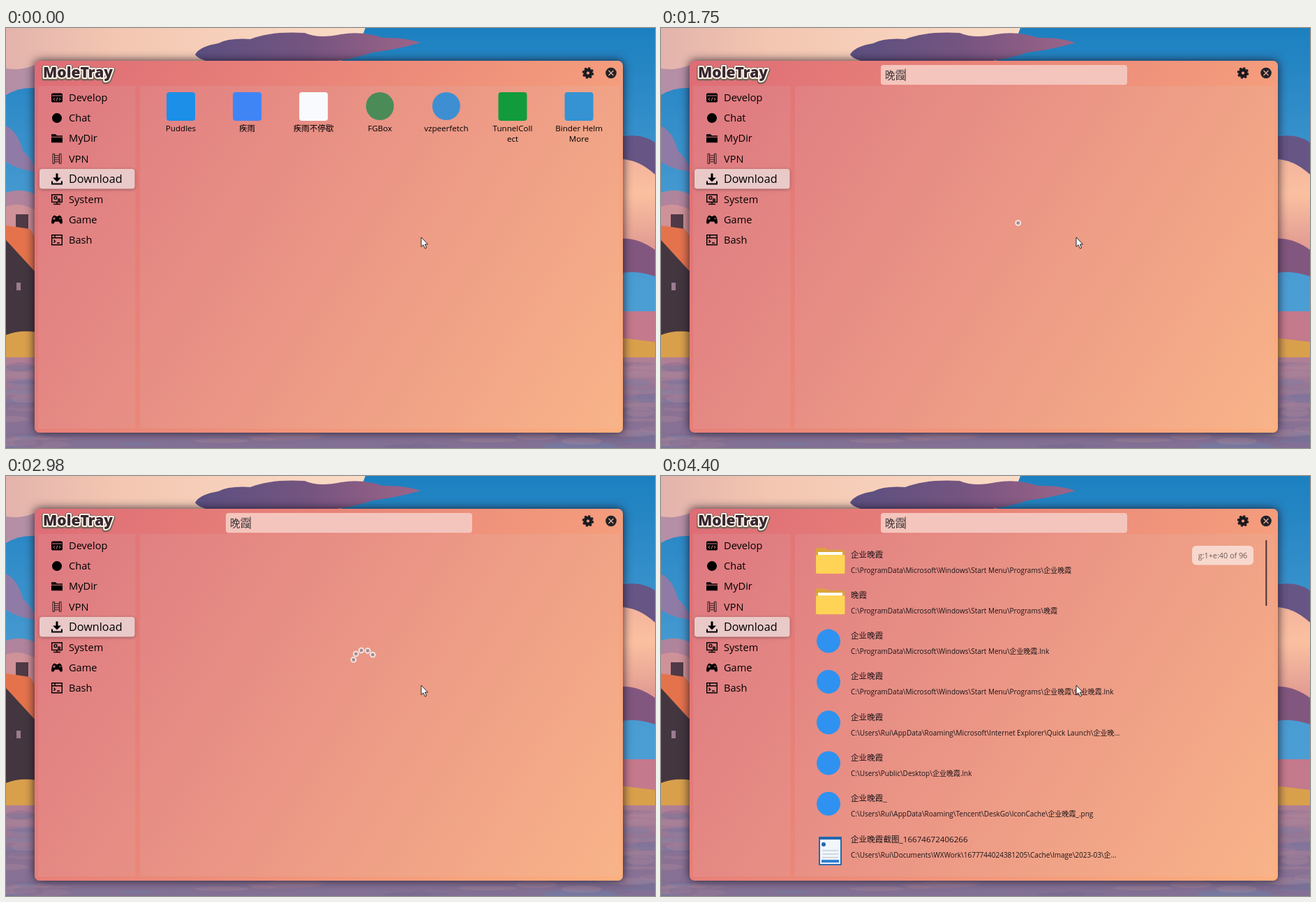
Animation of 930x602 px, one loop 4580 ms. Source, as an HTML page:

```html
<!DOCTYPE html>
<html lang="zh">
<head>
<meta charset="utf-8">
<style>
html, body { margin: 0; width: 100%; height: 100%; overflow: hidden; }
svg { display: block; width: 930px; height: 602px; font-family: "Open Sans", "Noto Sans CJK SC", "Noto Sans CJK", sans-serif; }
.mono { font-family: "Liberation Mono", monospace; }
.ime { font: bold 13px "Liberation Sans", sans-serif; }
.line { fill: none; stroke: #000; stroke-width: 1.4; }
</style>
</head>
<body>
<svg viewBox="0 0 930 602">
  <defs>
    <linearGradient id="sky" x2="0" y2="1">
      <stop offset="0" stop-color="#1c80c0"/><stop offset=".4" stop-color="#4599d0"/><stop offset=".7" stop-color="#4c9fd4"/>
    </linearGradient>
    <linearGradient id="peach">
      <stop offset="0" stop-color="#e3b3ac"/><stop offset=".3" stop-color="#f3c6b1"/><stop offset="1" stop-color="#fbdcc6"/>
    </linearGradient>
    <linearGradient id="glow" x2="0" y2="1">
      <stop offset="0" stop-color="#f3b49c"/><stop offset=".35" stop-color="#fbc0a0"/><stop offset="1" stop-color="#dc938f"/>
    </linearGradient>
    <linearGradient id="dusk">
      <stop offset="0" stop-color="#5b5080"/><stop offset=".5" stop-color="#755480"/><stop offset="1" stop-color="#9d6488"/>
    </linearGradient>
    <linearGradient id="water" x2="0" y2="1">
      <stop offset="0" stop-color="#b28095"/><stop offset=".5" stop-color="#8d7295"/><stop offset="1" stop-color="#827094"/>
    </linearGradient>
    <linearGradient id="pane" gradientUnits="userSpaceOnUse" x1="41" y1="47" x2="884" y2="580">
      <stop offset="0" stop-color="#de6c76"/><stop offset="1" stop-color="#fdb07f"/>
    </linearGradient>
  </defs>

  <g id="scene">
    <rect width="930" height="602" fill="url(#sky)"/>
    <path d="M0 0H515Q508 22 490 34L470 60H60Q30 80 0 76Z" fill="url(#peach)"/>
    <path d="M0 58Q22 62 44 52V86Q20 84 0 96Z" fill="#b48fa6"/>
    <path d="M0 140Q18 150 24 176Q36 186 44 206Q18 204 0 192Z" fill="#8f7ba6"/>
    <path d="M271 38Q278 26 304 22Q320 14 350 16Q380 4 428 7Q448 16 480 9Q510 4 540 14Q570 13 594 21Q560 31 525 35Q490 48 440 50H300Q276 46 271 38Z" fill="url(#dusk)"/>
    <path d="M0 236Q24 228 44 240V350H0Z" fill="#b0849c"/>
    <path d="M0 256Q20 248 44 262V300H0Z" fill="#cf9298"/>
    <path d="M880 156Q910 150 930 164V216H880Z" fill="#665585"/>
    <path d="M880 188Q906 188 930 210V330H880Z" fill="url(#glow)"/>
    <path d="M880 302Q905 300 930 318V356Q900 346 880 352Z" fill="#82577f"/>
    <path d="M880 406H930V450H880Z" fill="#c5798c"/>
    <path d="M0 410H44V470H0Z" fill="#a77a92"/>
    <path d="M14 267H32V292H14Z" fill="#503a47"/>
    <path d="M0 283L34 288L44 302V352L0 305Z" fill="#e4734c"/>
    <path d="M0 304L44 352V440H0Z" fill="#43363f"/>
    <path d="M15 365H21V376H15Z" fill="#9a7d92"/>
    <path d="M0 440Q20 432 44 436V473H0ZM880 444L930 450V473H880Z" fill="#d9a04c"/>
    <rect y="472" width="930" height="130" fill="url(#water)"/>
    <g id="ripples"></g>
  </g>

  <rect x="41" y="47" width="843" height="533" rx="7" fill="url(#pane)" style="filter:drop-shadow(0 0 7px #181020e0)"/>
  <g fill="#d0d0d8" fill-opacity=".11">
    <rect x="46" y="83" width="139.500" height="491"/><rect x="192" y="83" width="687" height="491"/>
  </g>
  <g font-size="21" font-weight="800" stroke-linejoin="round">
    <text x="53" y="72" fill="none" stroke="#7c6658" stroke-width="7">MoleTray</text>
    <text x="53" y="71" fill="#38262f" stroke="#fff5ea" stroke-width="4" paint-order="stroke">MoleTray</text>
  </g>
  <circle cx="834" cy="64.500" r="4.400" fill="none" stroke="#1c1b20" stroke-width="4.600"/>
  <circle cx="834" cy="64.500" r="7" fill="none" stroke="#1c1b20" stroke-width="2.600" stroke-dasharray="3.100 2.398"/>
  <circle cx="867" cy="64.500" r="7.800" fill="#222127"/>
  <path d="M863.500 61l7 7m0-7l-7 7" stroke="#e8b4a0" stroke-width="1.200"/>

  <rect x="48" y="202" width="136.500" height="28.500" rx="4" fill="#e9cac9" style="filter:drop-shadow(0 1px 2px #0005)"/>
  <g id="menu"></g>
  <g id="apps" font-size="11.600" text-anchor="middle"></g>
  <g id="search">
    <rect x="315" y="53" width="353" height="28.500" rx="4" fill="#f4c5bd"/>
    <text x="321" y="72.500" font-size="14.500" fill="#3a3033">晚霞</text>
    <path id="caret" d="M350 58.500V76" stroke="#222"/>
  </g>
  <g id="spinner" fill="#a08c94" stroke="#f6e3df" stroke-width="2"></g>
  <g id="results" fill="#1c1518"></g>
  <path id="bar" d="M867.300 92V186" stroke="#4a3434" stroke-width="2"/>
  <path d="M595 300V313.500L598 310.800L600.500 316L602.700 315L600.300 310H604.500Z" fill="#fff" stroke="#222"/>
  <g id="ime"></g>
</svg>

<script>
const $ = id => document.getElementById(id);
const LOOP = 4580;
const show = (id, on) => $(id).style.display = on ? '' : 'none';
const text = (x, y, s, extra = '') => `<text x="${x}" y="${y}" ${extra}>${s}</text>`;
const rect = (x, y, w, h, fill, r = 0) => `<rect x="${x}" y="${y}" width="${w}" height="${h}" rx="${r}" fill="${fill}"/>`;
const disc = (x, y, r, fill) => `<circle cx="${x}" cy="${y}" r="${r}" fill="${fill}"/>`;

// water streaks
let seed = 7;
const rnd = () => (seed = seed * 16807 % 2147483647) / 2147483647;
const tones = ['#6e7ea8', '#a58298', '#75678f', '#b08d9c'];
$('ripples').innerHTML = Array.from({length: 60}, (_, i) => {
  const edge = i % 3;
  const x = edge == 0 ? rnd() * 930 : edge == 1 ? rnd() * 40 : 890 + rnd() * 40;
  const y = edge == 0 ? 580 + rnd() * 22 : 482 + rnd() * 116;
  return `<ellipse cx="${x}" cy="${y}" rx="${15 + rnd() * 40}" ry="${2 + rnd() * 5}" fill="${tones[i % 4]}" opacity=".3"/>`;
}).join('');

// sidebar, icons drawn around their own centre
const menu = [
  ['Develop', `${rect(-8, -6.5, 16, 13, '#000', 2)}<path d="M-7-3H7M-3 0l-2 2 2 2M3 0l2 2-2 2M1-.5l-2 5" fill="none" stroke="#dc8187"/>`],
  ['Chat', disc(0, 0, 7, '#000')],
  ['MyDir', '<path d="M-8-6H-2L0-4H8V-2.500H-8ZM-8-1.500H8V6H-8Z"/>'],
  ['VPN', '<path class="line" style="stroke-width:.8" d="M-6-7h2.500V7h-2.500ZM3.500-7h2.500V7H3.500ZM-3.500-4.500h7M-3.500-1.500h7M-3.500 1.500h7M-3.500 4.500h7"/>'],
  ['Download', '<path d="M-1.500-8h3V-2H6L0 4-6-2h4.500ZM-8 3h2V6H6V3H8V8H-8Z"/>'],
  ['System', '<path class="line" d="M-7.300-6.500H7.300V4H-7.300ZM-5 7H5M0 4V7"/><circle class="line" cx="-2" cy="-2" r="2"/><circle class="line" cx="3" cy="1" r="1.500"/>'],
  ['Game', `<path d="M-4-6Q-2-6-1-4.500H1Q2-6 4-6Q8-4 8 5Q5 8 3 3H-3Q-5 8-8 5Q-8-4-4-6Z"/><path d="M-6-1.500h4m-2-2v4M3-1.500h3" stroke="#dc8187"/>`],
  ['Bash', '<path class="line" d="M-7.300-7H7.300V7H-7.300ZM-7-3H7M-3-7V-3M-4.500 0l2 2-2 2M0 4.500H4"/>']
];
$('menu').innerHTML = menu.map(([name, icon], i) => {
  const y = 100 + i * 29.1;
  return `<g transform="translate(73 ${y})">${icon}</g>` +
    text(90, y + 5.2, name, `font-size="${i == 4 ? 16.2 : 14.6}"`);
}).join('');

// launcher tiles
const apps = [
  ['#1c8fe8', 0, 'Puddles'], ['#4085f5', 0, '疾雨'], ['#f8fafd', 0, '疾雨不停歇'], ['#4b8b58', 1, 'FGBox'],
  ['#3d8fd2', 1, 'vzpeerfetch'], ['#129b3c', 0, 'TunnelColl', 'ect'], ['#3593d3', 0, 'Binder Helm', 'More']
];
$('apps').innerHTML = apps.map(([color, round, ...lines], i) => {
  const x = 250.5 + i * 95.1;
  return (round ? disc(x, 112, 20, color) : rect(x - 20.5, 92, 41, 41, color, 4)) +
    lines.map((s, k) => text(x, 148 + k * 15, s)).join('');
}).join('');

// search results
const start = 'C:\\ProgramData\\Microsoft\\Windows\\Start Menu\\';
const word = '晚霞', corp = '企业' + word;
const found = [
  [corp, start + 'Programs\\' + corp],
  [word, start + 'Programs\\' + word],
  [corp, start + corp + '.lnk'],
  [corp, `${start}Programs\\${corp}\\${corp}.lnk`],
  [corp, 'C:\\Users\\Rui\\AppData\\Roaming\\Microsoft\\Internet Explorer\\Quick Launch\\企业晚...'],
  [corp, `C:\\Users\\Public\\Desktop\\${corp}.lnk`],
  [corp + '_', `C:\\Users\\Rui\\AppData\\Roaming\\Tencent\\DeskGo\\IconCache\\${corp}_.png`],
  [corp + '截图_16674672406266', 'C:\\Users\\Rui\\Documents\\WXWork\\1677744024381205\\Cache\\Image\\2023-03\\企...']
];
const folder = y => `<path d="M222 ${y - 7}q0-2 2-2h12l3 3h22q2 0 2 2v20h-41Z" fill="#dca33a"/>` +
  rect(225, y - 3, 35, 8, '#fff') + rect(222, y + 1, 41.5, 27, '#ffd355', 2);
const page = y => rect(226, y - 3, 33, 41, '#2467ad', 1) + rect(228, y + 1, 29, 35, '#f1f6fb') +
  disc(233, y + 8, 3, '#2467ad') + [16, 21, 26].map(d => rect(231, y + d, 23, 1.5, '#c6cfda')).join('') +
  rect(230, y + 30, 25, 4, '#2c7fd0');
$('results').innerHTML = found.map(([name, path], i) => {
  const y = 112 + i * 58.3;
  const icon = i < 2 ? folder(y) : i < 7 ? disc(240, y + 8, 17, '#2f92f0') : page(y);
  return icon + text(272, y + 4.5, name, 'font-size="11.6"') + text(272, y + 26.5, path, 'font-size="10"');
}).join('') + rect(761, 100, 88, 27.5, '#f8d8cd', 6) +
  text(805, 117.5, 'g:1+e:40 of 96', 'font-size="10.8" text-anchor="middle" fill="#6e5b58"');

// input method popup: time, typed letters, right edge, candidates
const typed = [
  [1090, 'w', 814, '我 为 未 王 万'],
  [1140, 'wa', 814, '哇 挖 娃 瓦 袜'],
  [1250, 'wan', 814, '万 完 晚 玩 碗'],
  [1360, "wan'x", 884, '晚霞 玩笑 万象 万幸 完型'],
  [1460, "wan'xi", 919, '晚戏 万喜 玩嬉戏 万西 弯细'],
  [1570, "wan'xia", 884, '晚霞 弯下 万夏 玩下 碗下']
];
const red = '#d8262c';
const mascot = `<g transform="rotate(-27 -53 99)">
  <rect x="-69" y="92.500" width="32" height="13" fill="#fff" stroke="#222" stroke-width="1.600"/>
  ${text(-66, 102, '♥', `font-size="9" fill="${red}"`)}${text(-58, 102, 'xmas', 'font-size="8" font-weight="700"')}</g>
  ${disc(-52, 112, 1.8, '#222')}${disc(-21, 111, 1.8, '#222')}
  <path d="M-62 120Q-58 116-54 119Q-38 125-22 119Q-17 115-13 120Q-13 141-38 141Q-62 141-62 120Z" fill="#505453" stroke="#222"/>
  <path d="M-58 121l4 7 4-5 4 6 4-5 4 5 4-5 4 5 4-6 4 5 4-7Q-38 126-58 121ZM-54 137l3-4 4 5 4-4 5 4 5-4 4 4 4-5 3 4Q-38 143-54 137Z" fill="#fff"/>`;

function popup([, letters, right, list]) {
  let x = 514;
  const picks = list.split(' ').map((s, i) => {
    const color = `fill="${i ? '#222' : red}"`;
    const out = text(x, 136.5, i + 1 + '.', `class="mono" font-size="11.7" ${color}`) +
      text(x + 14, 137, s, `font-size="14" ${color}`);
    x += 25.5 + 14 * s.length;
    return out;
  }).join('');
  $('ime').innerHTML = `<rect x="504.500" y="78.500" width="${right - 505}" height="72" rx="9" fill="#add8ca" stroke="#15201c" stroke-width="1.300"/>
    <text class="ime" id="letters" x="514" y="104" fill="#222">${letters}</text>${picks}
    <g transform="translate(${right} 0)">
      <path d="M-96 127v10l-6-5Z" fill="#89a89f"/><path d="M-91 127v10l6-5Z" fill="#222"/>
      <rect x="-80.500" y="126" width="12" height="12" fill="none" stroke="#557068"/><path d="M-78 130.500h7l-3.500 4Z" fill="#222"/>
      ${mascot}
    </g>`;
  const end = 514.5 + $('letters').getComputedTextLength();
  $('ime').innerHTML += `<path d="M${end} 92V107" stroke="${red}"/>`;
}

// dots start at the bottom, rush to the top and then drift clockwise
function spinner(t) {
  const now = Math.min(t, 2980);
  let dots = '';
  for (let i = 0; i < 5; i++) {
    const u = now - 1745 - i * 80;
    if (u < 0) continue;
    const rush = Math.min(u / 428, 1);
    const turn = 180 * (1 - (1 - rush) ** 2) + Math.max(0, u - 428) * .07 - i * 30;
    const a = turn * Math.PI / 180;
    dots += `<circle cx="${513 - 15 * Math.sin(a)}" cy="${264.5 + 15 * Math.cos(a)}" r="3.4"/>`;
  }
  $('spinner').innerHTML = dots;
}

const blinks = [2190, 2620, 3160, 3550, 4000, 4400];
let lastStep = -1;
function draw(t) {
  const searching = t >= 1650;
  const step = searching ? -1 : typed.filter(s => s[0] <= t).length - 1;
  if (step >= 0 && step != lastStep) popup(typed[step]);
  lastStep = step;
  show('ime', step >= 0);
  show('apps', !searching);
  show('search', searching);
  show('caret', blinks.filter(b => b <= t).length % 2 == 0);
  show('spinner', searching && t < 3160);
  spinner(t);
  const fade = Math.min(1, Math.max(0, (t - 3140) / 410));
  show('results', t >= 3160);
  $('results').style.opacity = 1 - (1 - fade) ** 4;
  show('bar', t >= 3310);
}

const began = performance.now();
function tick() {
  draw((performance.now() - began) % LOOP);
  requestAnimationFrame(tick);
}
tick();
</script>
</body>
</html>
```
